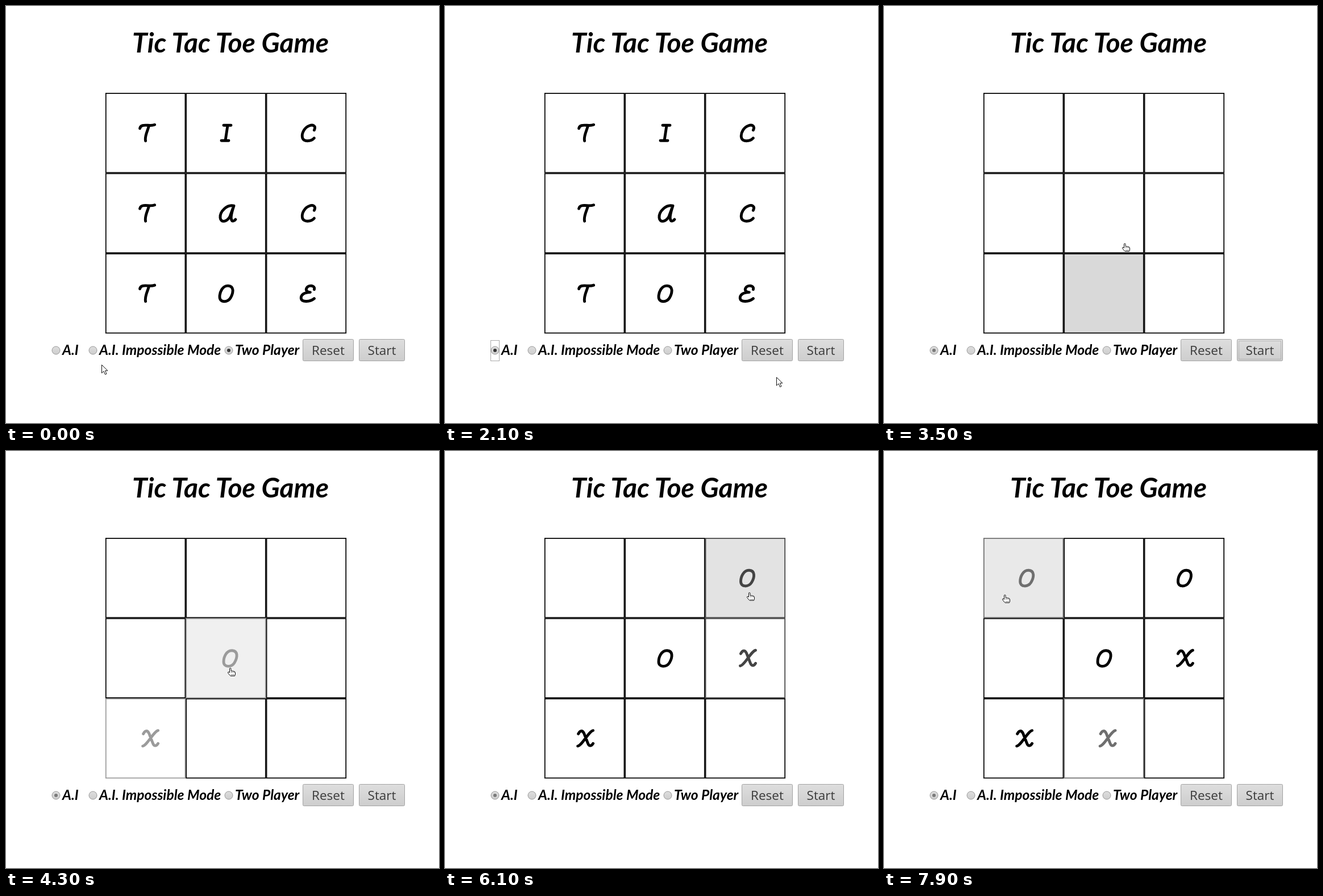
Animation of 762x735 px, one loop 8000 ms. Source, as an HTML page:

```html
<!DOCTYPE html>
<html lang="en">
<head>
<meta charset="utf-8">
<title>Tic Tac Toe Game</title>
<style>
  html, body { margin: 0; width: 100%; height: 100%; overflow: hidden; background: #fff; }
  svg { display: block; }
  .script { font: italic 700 24.6px Lato, sans-serif; }
  .title { font-size: 48px; }
  .button text { font: 22.5px "Open Sans", "Noto Sans", sans-serif; fill: #3b3b3b; text-anchor: middle; }
  .button rect { stroke: #a3a3a3; }
  .mark { fill: none; stroke: #000; stroke-width: 4.9; stroke-linecap: round; stroke-linejoin: round; }
  .ring { fill: none; stroke: #555; stroke-dasharray: 1 1; }
  .radio { fill: url(#face); stroke: #999; }
  .pointer { fill: #fff; stroke: #111; stroke-linejoin: round; }
</style>
</head>
<body>
<svg width="762" height="735" viewBox="0 0 762 735">
  <defs>
    <linearGradient id="face" x2="0" y2="1"><stop stop-color="#dedede"/><stop offset="1" stop-color="#cdcdcd"/></linearGradient>
    <linearGradient id="hover" x2="0" y2="1"><stop stop-color="#e8e8e8"/><stop offset="1" stop-color="#d8d8d8"/></linearGradient>
    <linearGradient id="pressed" x2="0" y2="1"><stop stop-color="#c4c4c4"/><stop offset="1" stop-color="#d4d4d4"/></linearGradient>
  </defs>
  <text class="script title" x="222" y="82">Tic Tac Toe Game</text>
  <g id="board"></g>

  <circle class="radio" cx="88" cy="607" r="7"/>
  <circle class="radio" cx="153" cy="607" r="7"/>
  <circle class="radio" cx="392" cy="607" r="7"/>
  <circle id="dot" cy="607" r="3"/>
  <rect id="radioRing" class="ring" x="80.5" y="589.5" width="15" height="36"/>
  <text class="script" x="99" y="615">A.I</text>
  <text class="script" x="164" y="615">A.I. Impossible Mode</text>
  <text class="script" x="403" y="615">Two Player</text>

  <g class="button">
    <rect x="522.5" y="587.5" width="89" height="38" rx="2" fill="url(#face)"/>
    <text x="567" y="615">Reset</text>
  </g>
  <g class="button">
    <rect id="start" x="621.5" y="587.5" width="80" height="38" rx="2"/>
    <text x="661.5" y="615">Start</text>
  </g>
  <rect id="startRing" class="ring" x="624.5" y="590.5" width="74" height="32" opacity=".5"/>

  <path id="arrow" class="pointer" d="M.5.5V15L4 11.7 6.5 17.5 9 16.4 6.5 10.8H11Z"/>
  <g id="hand" class="pointer">
    <path d="M4.5.5Q6 .5 6 2V5.5L11 6.3Q13.5 6.8 13.5 9V12L12.5 14.5H5L.7 9.5Q.2 7 2 7.4L3.5 8.6V2Q3.5.5 4.5.5Z"/>
    <path d="M6.5 6.5V9M9 7V9M11.5 7.5V9M5.5 12.5H12" stroke-width=".6"/>
  </g>
</svg>
<script>
const LOOP = 8000, TICK = 100;
const LEFT = 174.9, TOP = 153.1, CELL = 141.4, BORDER = 1.75;
const SELECT = 1400, PRESS = 2800, RELEASE = 3000, FIRST_MOVE = 4000;

// Brush-script letters, drawn around the middle of a cell
const GLYPHS = {
  T: "M-10-8C-9-14-3-14 4-13.5S13-13.5 16-14.5M6-13C4-4-2 5 0 14",
  I: "M-4-13.5H9M3-13L-1 13.5M-8 13.5H5",
  C: "M14-5C18-13 11-15 6-13C-3-10-8 0-7 7C-6 17 9 15 14 9",
  A: "M14-13C2-16-11-3-10 8C-9 17 1 16 7 6L14-13C11-4 8 8 10 12C11 15 15 14 17 11",
  O: "M4-13.5C-6-14-11-2-11 6C-11 17 3 16 8 8C14-2 14-13 4-13.5Z",
  E: "M14-7C16-15 4-15 1-10C-2-5 2-2 7-2C-4-2-10 3-9 9C-8 16 7 15 14 9",
  X: "M-11-8C-8-14-4-15-1-9L6 9C8 14 12 14 15 9M15-14C8-13-5 13-12 13.5"
};

// Start of the fade, cell taken by O, cell answered by X
const TURNS = [[4200, 4, 6], [5800, 2, 5], [7700, 0, 7]];

// Rests and turning points of the pointer: time, x, y
const ROUTE = [
  [200, 168, 632], [600, 100, 597], [700, 100, 597], [1200, 88, 607], [SELECT, 88, 607],
  [1900, 480, 670], [2100, 583, 654], [2400, 645, 613], [3200, 645, 613],
  [3500, 419, 418], [3800, 390, 382], [4600, 390, 382], [5200, 530, 267], [5300, 530, 267],
  [5500, 531, 249], [6400, 531, 249], [7100, 209, 257], [7300, 209, 257], [7400, 208, 253]
];

const $ = id => document.getElementById(id);
const show = (id, on) => $(id).setAttribute("visibility", on ? "visible" : "hidden");
const between = (t, from, to) => t >= from && t < to;

function make(tag, attrs, parent) {
  const el = document.createElementNS("http://www.w3.org/2000/svg", tag);
  for (const key in attrs) el.setAttribute(key, attrs[key]);
  return parent.appendChild(el);
}

const cells = Array.from({ length: 9 }, (_, i) => {
  const x = LEFT + i % 3 * CELL, y = TOP + Math.floor(i / 3) * CELL;
  const group = make("g", {}, $("board"));
  const box = make("rect", {
    x: x + BORDER / 2, y: y + BORDER / 2, width: CELL - BORDER, height: CELL - BORDER,
    stroke: "#000", "stroke-width": BORDER
  }, group);
  const mark = make("path", { class: "mark" }, group);
  return { group, box, mark, cx: x + CELL / 2, cy: y + CELL / 2 };
});

function pointerAt(t) {
  const next = ROUTE.findIndex(key => key[0] > t);
  if (next < 1) return ROUTE.at(next).slice(1);
  const [t0, x0, y0] = ROUTE[next - 1], [t1, x1, y1] = ROUTE[next];
  const u = (t - t0) / (t1 - t0), ease = u * u * (3 - 2 * u);
  return [x0 + (x1 - x0) * ease, y0 + (y1 - y0) * ease];
}

function cellAt([x, y]) {
  const col = Math.floor((x - LEFT) / CELL), row = Math.floor((y - TOP) / CELL);
  return between(col, 0, 3) && between(row, 0, 3) ? row * 3 + col : -1;
}

function setCell(i, letter, opacity = 1) {
  const { group, mark, cx, cy } = cells[i];
  group.setAttribute("opacity", opacity);
  mark.setAttribute("d", GLYPHS[letter] || "");
  mark.setAttribute("transform", `translate(${cx + 11.5 * (1 - opacity)} ${cy})`);
}

function drawBoard(t) {
  const hovered = cellAt(pointerAt(t - 75)); // the highlight trails the pointer
  cells.forEach(({ box }, i) => {
    box.setAttribute("fill", i === hovered ? "#d9d9d9" : "#fff");
    setCell(i, t < RELEASE ? "TICTACTOE"[i] : "");
  });
  for (const [start, o, x] of TURNS) {
    if (t < start) continue;
    const opacity = Math.min(1, .22 + .0017 * (t - start));
    setCell(o, "O", opacity);
    setCell(x, "X", opacity);
  }
}

function drawControls(t) {
  const [x, y] = pointerAt(t);
  const over = between(x, 621, 702) && between(y, 587, 626);
  const face = between(t, PRESS, RELEASE) ? "pressed" : over ? "hover" : "face";
  $("start").setAttribute("fill", `url(#${face})`);
  $("dot").setAttribute("cx", t < SELECT ? 392 : 88);
  $("dot").setAttribute("fill", t < RELEASE ? "#333" : "#7a7a7a");
  show("radioRing", between(t, SELECT, PRESS));
  show("startRing", between(t, PRESS, FIRST_MOVE));
}

function drawPointer(t) {
  const spot = pointerAt(t), onBoard = cellAt(spot) >= 0;
  show("arrow", !onBoard);
  show("hand", onBoard);
  $(onBoard ? "hand" : "arrow").setAttribute("transform", `translate(${spot.map(Math.round)})`);
}

function frame(now) {
  const t = Math.floor(now % LOOP / TICK) * TICK;
  drawBoard(t);
  drawControls(t);
  drawPointer(t);
  requestAnimationFrame(frame);
}
frame(0);
</script>
</body>
</html>
```
